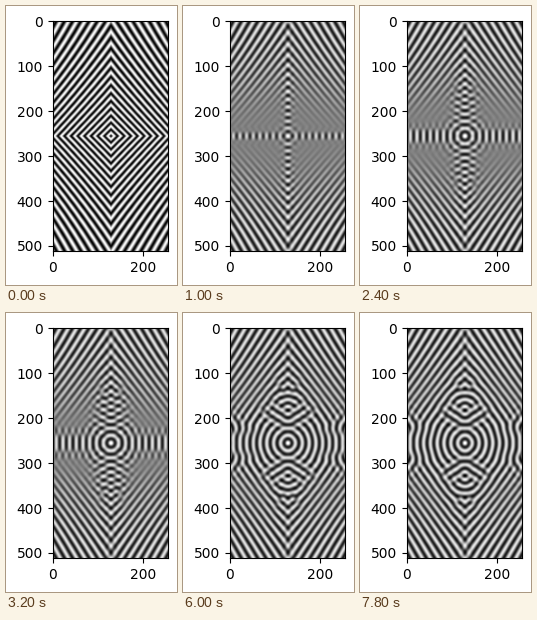
A matplotlib script for the animation above (8 s loop, 171x279 px).

```python
import numpy as np
import matplotlib.pyplot as plt
from matplotlib.animation import FuncAnimation

W, H, DPI = 171, 279, 100
FRAMES, INTERVAL = 40, 200

# Swift-Hohenberg equation, u_t = R u - (1 + lap)^2 u - u^3
R = 0.5
STEP = 2 * np.pi / 8    # eight grid points per preferred wavelength
DT, SUBSTEPS = 0.125, 6
NX, NY, PAD = 192, 320, 32


def centred(n):
    return (np.arange(n) - n / 2 + 0.5) * STEP


def start():
    """Diamonds around a dark centre, wider and steeper away from the middle row."""
    x = np.abs(centred(NX))[None, :]
    y = np.abs(centred(NY))[:, None]
    return -np.cos(1.09 * x * (1 - 0.0019 * y) + 1.115 * y * (1 - 0.0025 * y))


def evolve():
    kx = 2 * np.pi * np.fft.rfftfreq(NX, STEP)[None, :]
    ky = 2 * np.pi * np.fft.fftfreq(NY, STEP)[:, None]
    rate = R - (1 - kx**2 - ky**2) ** 2
    decay = np.exp(rate * DT)
    gain = np.expm1(rate * DT) / rate
    u = start()
    states = []
    for _ in range(FRAMES):
        states.append(u[PAD:-PAD, PAD:-PAD].copy())
        for _ in range(SUBSTEPS):
            u_hat = decay * np.fft.rfft2(u) - gain * np.fft.rfft2(u**3)
            u = np.fft.irfft2(u_hat, s=u.shape)
    return states


states = evolve()

plt.rcParams["font.family"] = "DejaVu Sans"
fig = plt.figure(figsize=(W / DPI, H / DPI), dpi=DPI, facecolor="white")
left, top, width, height = 46.7, 15.1, 115, 230
ax = fig.add_axes([left / W, 1 - (top + height) / H, width / W, height / H])
image = ax.imshow(states[0], cmap="gray", vmin=-1, vmax=1,
                  extent=(-0.5, 255.5, 511.5, -0.5))
ax.set_xticks([0, 200])
ax.set_yticks(range(0, 501, 100))


def draw(i):
    image.set_data(states[i])
    return (image,)


anim = FuncAnimation(fig, draw, frames=FRAMES, interval=INTERVAL, repeat=True)
plt.show()
```
